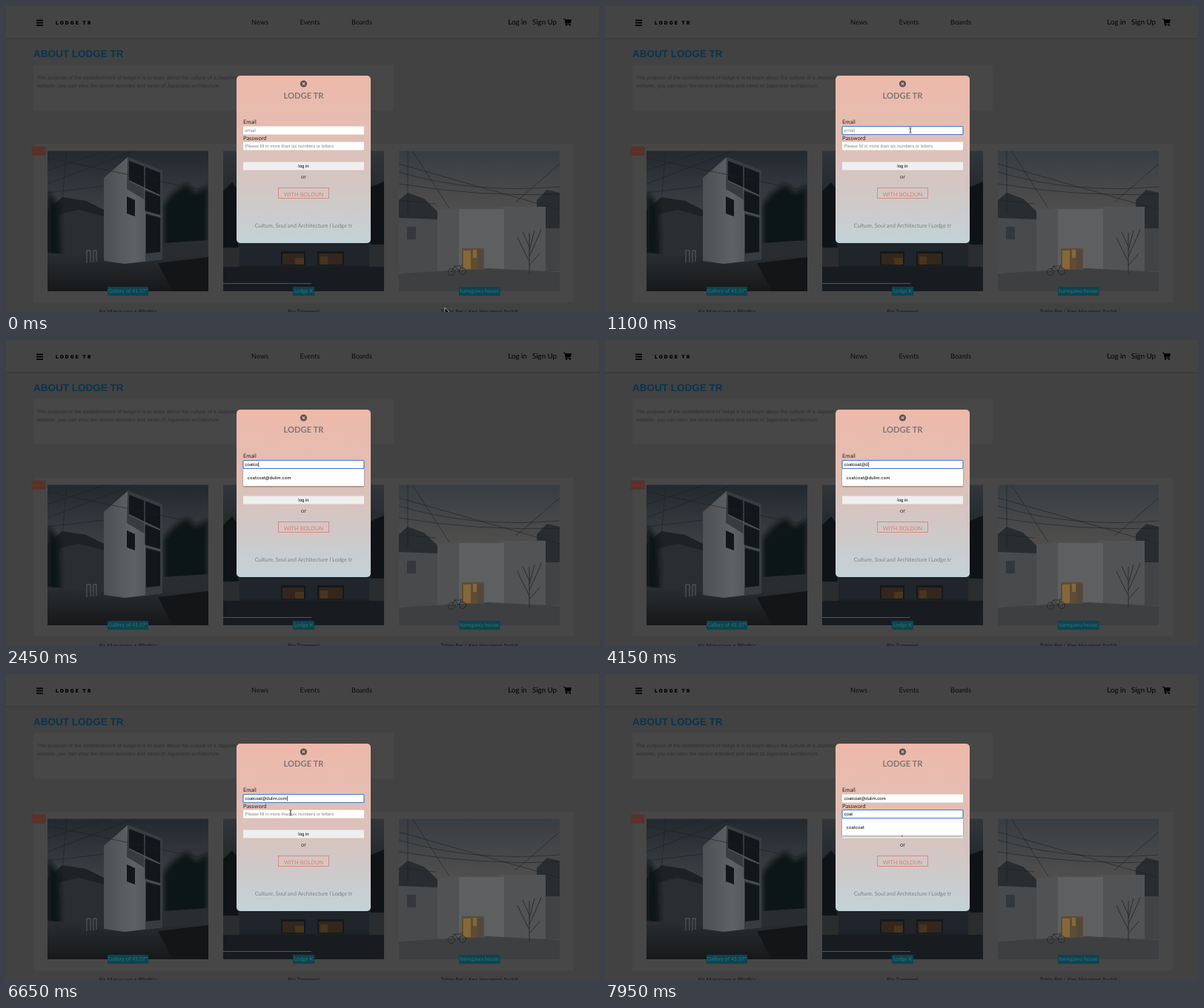
Recreate the animation shown at these times as an HTML page. Size 800 by 413 pixels, loop 8000 ms.

```html
<!DOCTYPE html>
<html lang="en">
<head>
<meta charset="utf-8">
<title>Log in</title>
<style>
html, body { margin: 0; width: 100%; height: 100%; overflow: hidden; background: #424242; }
svg { display: block; text-rendering: geometricPrecision; }
text { font-family: Lato, sans-serif; font-size: 7.5px; }
.mid { text-anchor: middle; }
.arial { font-family: "Liberation Sans", Arial, sans-serif; font-size: 6px; }
.para { font-size: 7.15px; fill: #2e2e2e; }
.nav { font-size: 9.2px; fill: #0c0c0c; }
.account { font-size: 9.7px; }
.hint { fill: #858585; }
.item { font-family: Inter, sans-serif; font-size: 5.7px; font-weight: 600; fill: #333; }
.tag { font-size: 7.2px; fill: #37707b; text-anchor: middle; }
.wire { fill: none; stroke: #1d2022; stroke-width: .6; }
</style>
</head>
<body>
<svg width="800" height="413" viewBox="0 0 800 413">
  <defs>
    <linearGradient id="panel" x2="0" y2="1">
      <stop stop-color="#edb9aa"/><stop offset=".3" stop-color="#e5bdb1"/>
      <stop offset=".65" stop-color="#d3c6c3"/><stop offset="1" stop-color="#c3d2d8"/>
    </linearGradient>
    <linearGradient id="sky1" x2="0" y2="1"><stop stop-color="#22292f"/><stop offset=".5" stop-color="#414548"/></linearGradient>
    <linearGradient id="sky2" x2="0" y2="1"><stop stop-color="#30363a"/><stop offset=".5" stop-color="#1c2023"/></linearGradient>
    <linearGradient id="sky3" x2="0" y2="1"><stop stop-color="#383d43"/><stop offset=".45" stop-color="#52504e"/></linearGradient>
    <linearGradient id="road" x2="0" y2="1"><stop stop-color="#2b2e30"/><stop offset="1" stop-color="#16181a"/></linearGradient>
    <linearGradient id="wall" x2="1" y2="0"><stop stop-color="#4d5053"/><stop offset=".5" stop-color="#5f6264"/><stop offset="1" stop-color="#484c50"/></linearGradient>
    <filter id="soft"><feDropShadow dx="0" dy="1" stdDeviation="1.2" flood-opacity=".4"/></filter>
    <filter id="blur"><feGaussianBlur stdDeviation="3"/></filter>
    <clipPath id="clip"><path d="M56 195.5h217v189.5h-217zM293 195.5h217v189.5h-217zM530 195.5h217v189.5h-217z"/></clipPath>
  </defs>

  <!-- dimmed page -->
  <rect width="800" height="413" fill="#424242"/>
  <rect width="800" height="44" fill="#444"/>
  <rect y="43.5" width="800" height="1" fill="#363636"/>
  <path d="M41 19.3h9M41 22.7h9M41 26.1h9" stroke="#000" stroke-width="1.7"/>
  <text x="67" y="24.5" style="font:900 6.6px Inter,sans-serif;letter-spacing:2.1px">LODGE TR</text>
  <g class="mid">
    <text class="nav" x="342.5" y="25">News</text>
    <text class="nav" x="410" y="25">Events</text>
    <text class="nav" x="480" y="25">Boards</text>
    <text class="account" x="690" y="25">Log in</text>
    <text class="account" x="726.5" y="25">Sign Up</text>
  </g>
  <path d="M752 17h2.3l.4 1.3h8.3l-1.2 5h-6l.2 1h5.6v1h-6.6l-1.4-7.2H752z"/>
  <circle cx="756" cy="26" r="1.1"/><circle cx="761" cy="26" r="1.1"/>

  <text class="arial" x="37" y="69.3" fill="#0a344d" style="font-size:13.5px;font-weight:bold">ABOUT LODGE TR</text>
  <rect x="37" y="79" width="486" height="62" rx="3" fill="#474747"/>
  <text class="arial para" x="42" y="99">The purpose of the establishment of lodge tr is to learn about the culture of a Japanese house and to share the beauty of it. Through the</text>
  <text class="arial para" x="42" y="110">website, you can view the recent activities and news of Japanese architecture.</text>

  <rect x="37" y="186" width="729" height="214" fill="#474747"/>
  <g clip-path="url(#clip)">
    <rect x="56" y="195" width="217" height="190" fill="url(#sky1)"/>
    <path d="M56 275l20-17 32 5 24 12v75H56z" fill="#1f2224"/>
    <path d="M68 282l30-7 34 9v56H68z" fill="#2b2e30"/>
    <path d="M56 250l16 20 2 68H56zM212 268l14-16 18-12 12 12 17-10v106h-61z" fill="#0f1214" filter="url(#blur)"/>
    <path d="M56 333l104 10 113-8v50H56z" fill="url(#road)"/>
    <path d="M205 347l68-8v46h-48z" fill="#131517"/>
    <path d="M132 232l32-28 47 18v120l-51 6-28-4z" fill="url(#wall)"/>
    <path d="M164 204l47 18v120l-23 3V262l-25-15z" fill="#373c40"/>
    <path d="M166 209l42 16v30l-42-20zM187 249l21 8v25l-21-6zM189 281l19 5v46l-19 2zM163 257l11 5v22l-11-4z" fill="#12171b"/>
    <path d="M187 217v116M166 236l42 20M188 278l21 6" stroke="#5a5f62" fill="none"/>
    <path d="M212 320l61-4v20l-61 6z" fill="#2a2d30"/>
    <path d="M109 347v-17h5v16M118 346v-16h4v15" stroke="#5c5e5f" fill="none"/>
    <path class="wire" d="M56 222l80-27M56 240l118-45M56 205l217 45M56 252l76-9M82 195l-8 90"/>

    <rect x="293" y="195" width="217" height="190" fill="url(#sky2)"/>
    <path d="M293 250l12-12 8 10v105h-20zM490 245l20-8v110h-20z" fill="#101315"/>
    <path d="M314 300h178v50H314z" fill="#1f252b"/>
    <path d="M293 326h22v32h-22zM490 322h20v34h-20z" fill="#2a2c2e"/>
    <path d="M371 331h33v19h-33zM420 331h36v19h-36z" fill="#14181b"/>
    <path d="M373 334h29v15h-29zM422 334h32v15h-32z" fill="#33271d"/>
    <path d="M390 340h12v9h-12zM424 338h10v11h-10z" fill="#4a341e"/>
    <path d="M293 352h217v33H293z" fill="#181c21"/>
    <path d="M293 374.5h119" stroke="#50545a"/>

    <rect x="530" y="195" width="217" height="190" fill="url(#sky3)"/>
    <path d="M530 262l12-10 22 8 18 17v30h-52zM716 262l14-14 17 4v60h-31z" fill="#2a2d2f"/>
    <path d="M530 286l52 2v72h-52z" fill="#484a4c"/>
    <path d="M664 271h64v88h-64z" fill="#515355"/>
    <path d="M728 300h19v58h-19z" fill="#414345"/>
    <path d="M582 277l29-3h61v84h-90z" fill="#5d5f61"/>
    <path d="M582 277l29-3v86l-29 5z" fill="#505254"/>
    <path d="M530 361l120-7 97 5v26H530z" fill="#3d3f41"/>
    <path d="M615 327h30v29h-30z" fill="#5f4c35"/>
    <path d="M617 330h10v25h-10zM630 329h5v11h-5z" fill="#85683a"/>
    <path d="M636 329h8v27h-8z" fill="#51483f"/>
    <path d="M541 298h12v17h-12z" fill="#33383c"/>
    <path d="M706 361v-55M706 345l-12-24M706 338l13-29M706 325l-9-20M706 350l14-16M706 330l7-27M694 321l-4-9M719 309l3-8" stroke="#2a2c2c" fill="none"/>
    <g fill="none" stroke="#222426" stroke-width=".8"><circle cx="601" cy="359" r="4.6"/><circle cx="616" cy="358" r="4.6"/><path d="M601 359l4-8 6 7 4-9M605 351h9"/></g>
    <path class="wire" d="M530 224q100 30 217 20M530 240q110 18 217 14M530 213l217 62M542 195v85M530 262l50 5M747 213l-60 52M548 195l50 78"/>
  </g>
  <g fill="#0b4550">
    <rect x="137" y="379" width="55" height="12"/><rect x="387" y="379" width="29" height="12"/><rect x="611" y="379" width="55.5" height="12"/>
  </g>
  <text class="tag" x="164.5" y="387.3">Gallery of 41.57°</text>
  <text class="tag" x="401.5" y="387.3">Lodge K</text>
  <text class="tag" x="638.5" y="387.3">hanegawa house</text>
  <rect x="34.5" y="189.5" width="19" height="12.5" fill="#55332d"/>
  <text class="mid" x="44" y="198" fill="#7a2e22" style="font-size:6.2px">latest</text>
  <g class="mid" fill="#161616">
    <text x="164.5" y="414.5">Ko Marusawa + Plinthia</text>
    <text x="401.5" y="414.5">Rio Tanemori</text>
    <text x="638.5" y="414.5">Tobin Rei / Ken Haramori Archit</text>
  </g>

  <!-- dialog -->
  <rect x="311" y="94" width="181" height="226" rx="5" fill="url(#panel)"/>
  <circle cx="401.5" cy="105" r="4.6" fill="#5e5350"/>
  <path d="M399.8 103.3l3.4 3.4m0-3.4l-3.4 3.4" stroke="#ecbaac" stroke-width="1.2"/>
  <text class="mid" x="401.5" y="125.3" fill="#7f7674" style="font-size:11.2px;font-weight:bold">LODGE TR</text>
  <text x="320" y="159.3" fill="#2b2321">Email</text>
  <text x="320" y="180.6" fill="#2b2321">Password</text>
  <rect x="320" y="162.5" width="163" height="11" fill="#fff"/>
  <rect x="320" y="183.5" width="163" height="11" fill="#fff"/>
  <rect x="320" y="210.5" width="163" height="11" fill="#efefef"/>
  <text class="arial mid" x="401.5" y="218">log in</text>
  <text class="mid" x="401.5" y="233.3" fill="#333">or</text>
  <rect x="367.5" y="245.5" width="68" height="14" fill="none" stroke="#e27a69" stroke-width=".8"/>
  <text class="mid" x="401.5" y="257" fill="#e27a69">WITH BOLDUN</text>
  <text class="mid" x="401.5" y="299" fill="#7d8284">Culture, Soul and Architecture l Lodge tr</text>
  <g id="live"></g>
</svg>
<script>
const LOOP = 8000, STEP = 50, LEFT = 322.6;
const USER = 'coat', ADDRESS = 'coatcoat@dulim.com';
const FOCUS_EMAIL = 600, EMAIL_DONE = 6050, FOCUS_PASS = 6900;
const emailKeys = [1400, 1500, 1600, 1850, 1950, 2450, 2650, 2850, 3850,
  4150, 4650, 4700, 4900, 5100, 5500, 5600, 5800, 6050];
const passKeys = [7450, 7550, 7650, 7850];
const blinkStarts = [FOCUS_EMAIL, ...emailKeys, 6550, ...passKeys];
const saved = ['010101', '454545', '12345', 'abc', 'ddd', '565656'];
const live = document.getElementById('live');
const pen = document.createElement('canvas').getContext('2d');
pen.font = '60px "Liberation Sans", Arial, sans-serif';

const typed = (word, keys, t) => word.slice(0, keys.filter(k => k <= t).length);
const lerp = (a, b, p) => a + (b - a) * p;
const ease = (t, from, to) => {
  const p = Math.min(1, Math.max(0, (t - from) / (to - from)));
  return p * p * (3 - 2 * p);
};

function field(y, value, hint, focused, caret) {
  const x = LEFT + pen.measureText(value).width / 10 + .3;
  return (focused ? `<rect x="320" y="${y}" width="163" height="11" rx="1" fill="none" stroke="#3f7cd0" stroke-width="1.2"/>` : '') +
    `<text class="arial ${value ? '' : 'hint'}" x="${LEFT}" y="${y + 7.4}">${value || hint}</text>` +
    (focused && caret ? `<rect x="${x}" y="${y + 2}" width=".6" height="7" fill="#000"/>` : '');
}

function menu(y, items) {
  return `<rect x="320" y="${y}" width="163" height="${23 + 16.25 * (items.length - 1)}" rx="1.5" fill="#fff" filter="url(#soft)"/>` +
    items.map((s, i) => `<text class="item" x="325.6" y="${y + 13.8 + 16.25 * i}">${s}</text>`).join('');
}

const arrow = (x, y) => `<path transform="translate(${x} ${y})" d="M0 0v8.5l2-1.8 1.4 3.3 1.3-.6-1.4-3.2h2.7z" stroke="#ddd" stroke-width=".7"/>`;
const beam = (x, y) => `<path transform="translate(${x} ${y})" d="M-1.8-3.8q1.8 0 1.8 1v5.6q0 1-1.8 1M1.8-3.8q-1.8 0-1.8 1v5.6q0 1 1.8 1" fill="none" stroke="#333" stroke-width=".7"/>`;

function pointer(t) {
  if (t < emailKeys[0]) {
    const p = ease(t, 150, FOCUS_EMAIL), x = lerp(592, 412, p), y = lerp(407, 167.7, p);
    return (y < 173 ? beam : arrow)(x, y);
  }
  if (t < 6200 || t >= passKeys[0]) return '';
  const p = ease(t, 6450, 6750);
  return beam(lerp(402, 377.7, p), lerp(174, 192, p));
}

function scene(t) {
  const start = blinkStarts.filter(s => s <= t).pop();
  const caret = (t - start) % 1000 < 500 && t < 7950;
  const onPass = t >= FOCUS_PASS;
  const email = typed(ADDRESS, emailKeys, t), pass = typed(USER, passKeys, t);
  let list = '';
  if (email && t < EMAIL_DONE)
    list = menu(174, [USER + '@dulim.com', ADDRESS].filter(s => s.startsWith(email)));
  else if (onPass)
    list = menu(195, pass ? [USER + USER] : saved);
  return field(162.5, email, 'email', t >= FOCUS_EMAIL && !onPass, caret) +
    field(183.5, pass, 'Please fill in more than six numbers or letters', onPass, caret) +
    list + pointer(t);
}

let shown;
function draw() {
  const t = Math.floor(performance.now() % LOOP / STEP) * STEP;
  if (t !== shown) live.innerHTML = scene(shown = t);
  requestAnimationFrame(draw);
}
draw();
</script>
</body>
</html>
```
